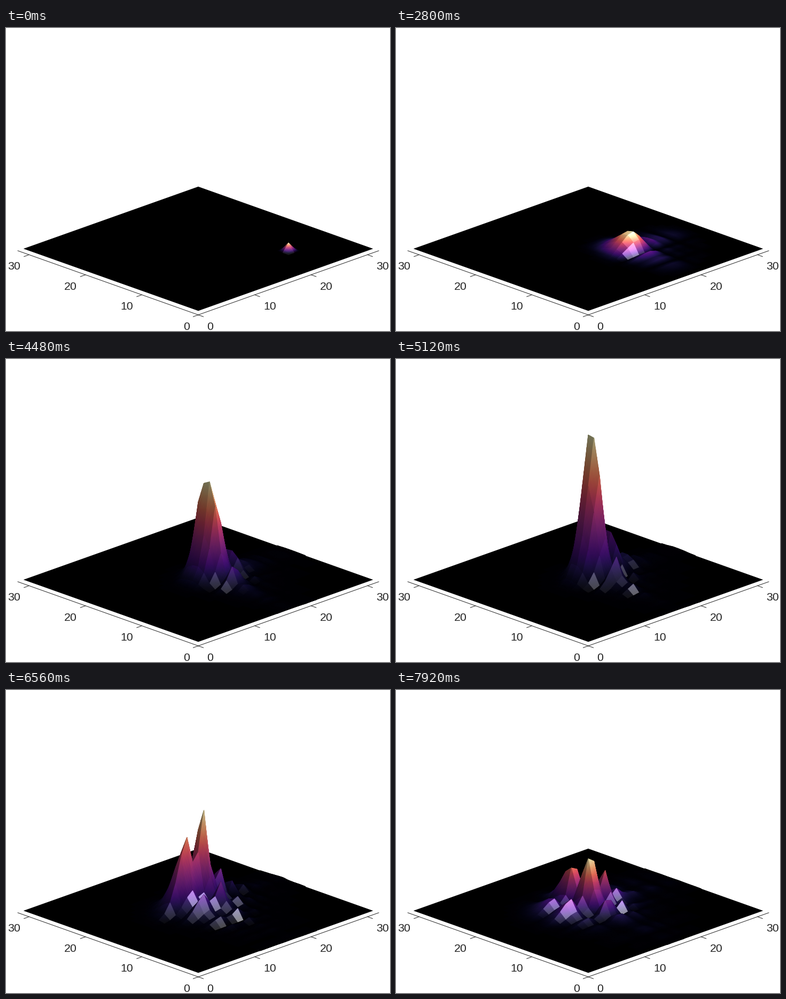
A matplotlib script that plays this animation: 719 px wide and 567 px high, repeating every 8000 ms.

```python
import numpy as np
import matplotlib.pyplot as plt
from matplotlib.animation import FuncAnimation
from matplotlib.collections import TriMesh
from matplotlib.tri import Triangulation

WIDTH, HEIGHT, DPI = 719, 567, 64
FRAMES, INTERVAL = 100, 80
INK = "#262626"

# Oblique view of the lattice, in pixels per site
SIZE = 32
ORIGIN_X, ORIGIN_Y = 360, 536.8
STEP_X, STEP_Y = 10.56, 3.75
LIFT = 14.65
SIDE = STEP_X * np.sqrt(2)
SIN_EL = STEP_Y / STEP_X
COS_EL = np.sqrt(1 - SIN_EL ** 2)

# Lighting
VIEW = np.array([-COS_EL / np.sqrt(2), -COS_EL / np.sqrt(2), SIN_EL])
LIGHT = np.array([0.2, -0.55, 0.81])
LIGHT /= np.linalg.norm(LIGHT)
AMBIENT, DIFFUSE, SPECULAR, SHINE = 0.45, 0.6, 0.6, 10

# Asymmetric hopping, both halves driving towards the FUNNEL site
FUNNEL, START_A, START_B = 17, 24, 8
STRONG, WEAK, DT = 1.0, 0.5, 0.1
SITES = np.arange(1, SIZE + 1)
HOP = np.sqrt(STRONG * WEAK)
ENERGY, MODES = np.linalg.eigh(HOP * (np.eye(SIZE, k=1) + np.eye(SIZE, k=-1)))

# Each lattice cell is split into SPLIT x SPLIT patches, listed back to front
SPLIT = 4
FRAC = np.linspace(1, 0, SPLIT + 1)
FA, FB = (f.ravel() for f in np.meshgrid(FRAC, FRAC, indexing="ij"))
CORNER = (np.arange(SPLIT)[:, None] * (SPLIT + 1) + np.arange(SPLIT)).ravel()
PATCH = np.stack([CORNER, CORNER + 1, CORNER + SPLIT + 1,
                  CORNER + 1, CORNER + SPLIT + 2, CORNER + SPLIT + 1],
                 axis=1).reshape(-1, 3)
MAGMA = plt.get_cmap("magma")


def project(a, b, z=0):
    return ORIGIN_X + STEP_X * (a - b), ORIGIN_Y - STEP_Y * (a + b) - LIFT * z


def amplitude(start, time):
    """Magnitude of a single-site excitation on the 1D lattice."""
    wave = MODES @ (np.exp(-1j * ENERGY * time) * MODES[start - 1])
    gain = (abs(start - FUNNEL) - abs(SITES - FUNNEL)) / 2
    return np.abs(wave) * (STRONG / WEAK) ** gain


def shade(slope_a, slope_b):
    """Diffuse factor and highlight of every cell."""
    normal = np.stack([-slope_a, -slope_b, np.full_like(slope_a, SIDE)], axis=-1)
    normal /= np.linalg.norm(normal, axis=-1, keepdims=True)
    facing = normal @ LIGHT
    mirror = 2 * facing[:, None] * normal - LIGHT
    glint = np.clip(mirror @ VIEW, 0, 1) ** SHINE * (facing > 0)
    return AMBIENT + DIFFUSE * np.clip(facing, 0, 1), SPECULAR * glint


def build_surface(frame):
    time = frame * DT
    z = np.outer(amplitude(START_A, time), amplitude(START_B, time))
    corners = np.stack([z[:-1, :-1], z[1:, :-1], z[:-1, 1:], z[1:, 1:]])
    ia, ib = np.nonzero(corners.max(axis=0) > 0.03)
    order = np.lexsort((-ib, -ia))
    ia, ib = ia[order], ib[order]
    z00, z10, z01, z11 = corners[:, ia, ib]

    scale = LIFT / COS_EL / 2
    lit, glint = shade((z10 + z11 - z00 - z01) * scale,
                       (z01 + z11 - z00 - z10) * scale)

    col = lambda v: v[:, None]
    value = (col(z00) * (1 - FA) * (1 - FB) + col(z10) * FA * (1 - FB)
             + col(z01) * (1 - FA) * FB + col(z11) * FA * FB)
    x, y = project(col(ia) + 1 + FA, col(ib) + 1 + FB, value)

    rgba = MAGMA(value / z.max())
    rgba[..., :3] = np.clip(rgba[..., :3] * lit[:, None, None]
                            + glint[:, None, None], 0, 1)
    offset = np.arange(len(ia))[:, None, None] * FA.size
    triangles = (PATCH + offset).reshape(-1, 3)
    mesh = TriMesh(Triangulation(x.ravel(), y.ravel(), triangles), zorder=2)
    mesh.set_facecolor(rgba.reshape(-1, 4))
    return mesh


def draw_axes():
    floor = [project(a, b) for a, b in
             ((1, 1), (SIZE, 1), (SIZE, SIZE), (1, SIZE))]
    ax.fill(*zip(*floor), color="black", lw=0, zorder=1)
    for side in (1, -1):
        line = dict(color=INK, lw=1 * 72 / DPI, zorder=1)
        ax.plot([ORIGIN_X, ORIGIN_X + side * SIZE * STEP_X],
                [ORIGIN_Y, ORIGIN_Y - SIZE * STEP_Y], **line)
        for tick in (0, 10, 20, 30):
            x = ORIGIN_X + side * tick * STEP_X
            y = ORIGIN_Y - tick * STEP_Y
            ax.plot([x, x + side * 9.5], [y, y + 3.4], **line)
            shift = 28.5 if tick else 22
            ax.text(x + side * shift, y + 27.8, str(tick), color=INK,
                    family="Liberation Sans", fontsize=21.3 * 72 / DPI,
                    ha="center", va="baseline")


fig = plt.figure(figsize=(WIDTH / DPI, HEIGHT / DPI), dpi=DPI, facecolor="white")
ax = fig.add_axes([0, 0, 1, 1])
ax.axis("off")
draw_axes()
ax.set_xlim(0, WIDTH)
ax.set_ylim(HEIGHT, 0)
surface = []


def update(frame):
    while surface:
        surface.pop().remove()
    surface.append(ax.add_collection(build_surface(frame), autolim=False))
    return surface


anim = FuncAnimation(fig, update, frames=FRAMES, interval=INTERVAL,
                     repeat=True, repeat_delay=0, blit=False)
plt.show()
```
